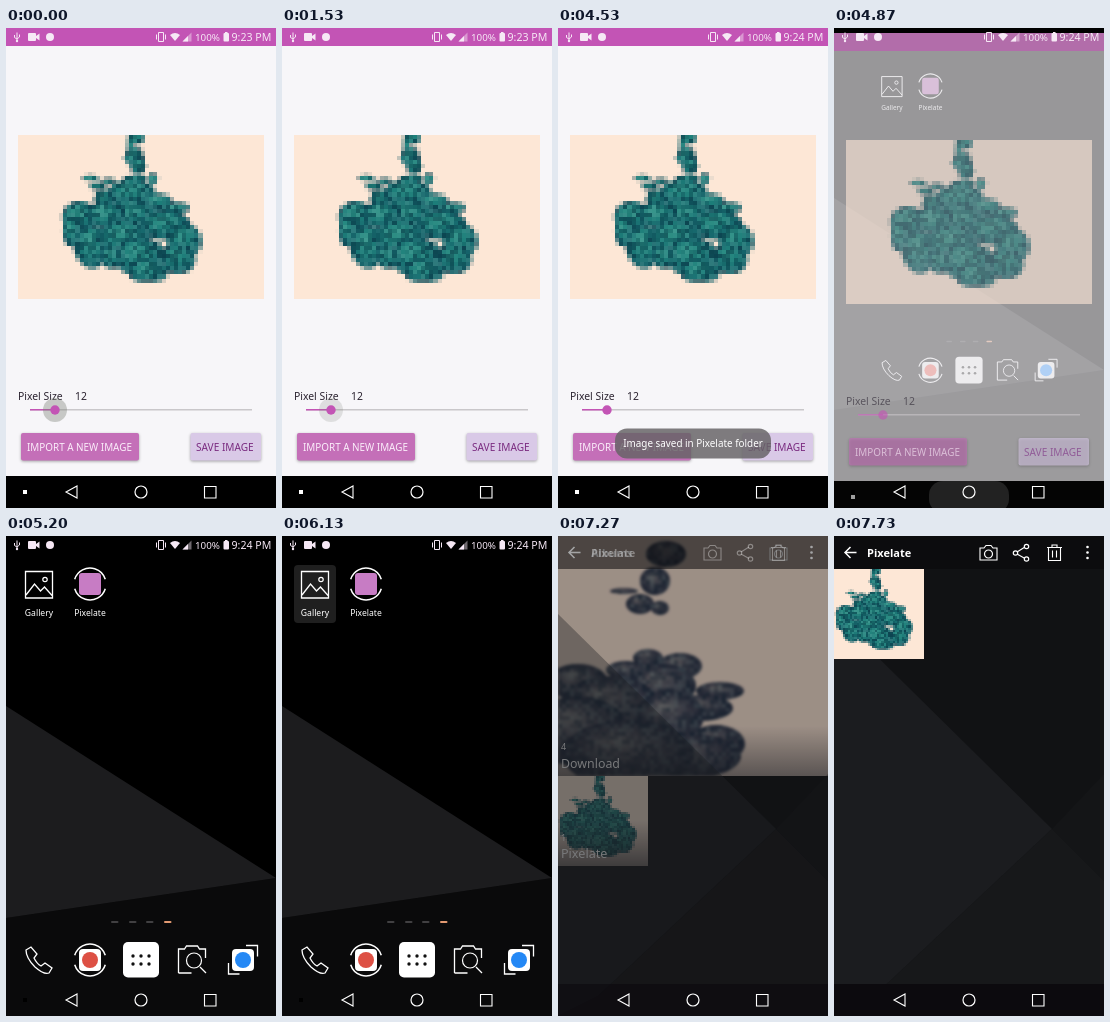
Animation of 270x480 px, one loop 8000 ms. Source, as an HTML page with a canvas:

```html
<!DOCTYPE html>
<html lang="en">
<head>
<meta charset="utf-8">
<title>Pixelate</title>
<style>
html, body { margin: 0; width: 100%; height: 100%; overflow: hidden; background: #000; }
canvas { display: block; }
</style>
</head>
<body>
<canvas id="stage" width="270" height="480"></canvas>
<script>
const c = document.getElementById('stage').getContext('2d');
const LOOP = 8000, TAU = Math.PI * 2;
const PURPLE = '#c354b5', PEACH = '#fde7d6';

const ramp = (t, a, b) => Math.min(1, Math.max(0, (t - a) / (b - a)));
const noise = n => { const v = Math.sin(n * 127.1 + 3.7) * 43758.5453; return v - Math.floor(v); };

function text(s, x, y, size, color, weight = 400, align = 'left') {
  c.font = `${weight} ${size}px "Noto Sans", "Open Sans", sans-serif`;
  c.textAlign = align;
  c.fillStyle = color;
  c.fillText(s, x, y);
}
function box(x, y, w, h, color, r = 0) {
  c.fillStyle = color;
  c.beginPath();
  c.roundRect(x, y, w, h, r);
  c.fill();
}
function dot(x, y, r, color) {
  c.fillStyle = color;
  c.beginPath();
  c.arc(x, y, r, 0, TAU);
  c.fill();
}
function stroke(path, color = '#fff', width = 1.1) {
  c.strokeStyle = color;
  c.lineWidth = width;
  c.stroke(new Path2D(path));
}
function fill(path, color) {
  c.fillStyle = color;
  c.fill(new Path2D(path));
}
function ring(x, y, r, from = 0, to = TAU, width = 1.2) {
  c.strokeStyle = '#fff';
  c.lineWidth = width;
  c.beginPath();
  c.arc(x, y, r, from, to);
  c.stroke();
}
// Draws a group with its own opacity and offset
function layer(alpha, dy, draw) {
  if (alpha <= 0) return;
  c.save();
  c.globalAlpha *= alpha;
  c.translate(0, dy);
  draw();
  c.restore();
}

// Ink clouds: shaded ellipses [x, y, rx, ry], then random mottling
function inkCloud(w, h, cell, blobs, tones, paper) {
  const make = () => {
    const el = document.createElement('canvas');
    el.width = Math.round(w / cell);
    el.height = Math.round(h / cell);
    return el;
  };
  const ink = make(), g = ink.getContext('2d');
  g.scale(1 / cell, 1 / cell);
  for (const [x, y, rx, ry] of blobs) {
    g.save();
    g.translate(x, y);
    g.scale(rx, ry);
    const shade = g.createRadialGradient(-.25, -.45, 0, 0, 0, 1);
    tones.forEach((tone, i) => shade.addColorStop(i / (tones.length - 1), tone));
    g.fillStyle = shade;
    g.beginPath();
    g.arc(0, 0, 1, 0, TAU);
    g.fill();
    g.restore();
  }
  g.globalCompositeOperation = 'source-atop';
  const step = Math.max(cell, 4);
  for (let y = 0, n = 0; y < h; y += step)
    for (let x = 0; x < w; x += step) {
      const v = noise(++n);
      g.fillStyle = v < .5 ? `rgba(0,30,50,${.45 - v * .7})` : `rgba(150,205,195,${(v - .5) * .4})`;
      g.fillRect(x, y, step, step);
    }
  const out = make(), o = out.getContext('2d');
  o.fillStyle = paper;
  o.fillRect(0, 0, out.width, out.height);
  if (cell === 1) o.filter = 'blur(1.5px)';
  o.drawImage(ink, 0, 0);
  return out;
}

const teal = inkCloud(246, 164, 4.1, [
  [118, 4, 9, 6], [116, 22, 10, 10], [120, 31, 8, 9], [112, 10, 3, 6],
  [72, 43, 9, 3], [80, 51, 9, 4], [91, 46, 8, 3], [135, 44, 5, 6], [117, 44, 13, 4],
  [114, 58, 24, 14], [86, 64, 10, 10], [155, 73, 17, 6], [140, 66, 14, 8],
  [62, 82, 18, 16], [54, 96, 9, 15], [112, 82, 32, 18], [88, 80, 20, 14],
  [74, 112, 18, 22], [147, 90, 26, 15], [166, 106, 18, 18], [160, 124, 18, 15],
  [106, 104, 26, 20], [122, 122, 27, 20], [130, 136, 20, 11], [94, 122, 10, 12]
], ['#2d9186', '#1b7c78', '#135c66'], PEACH);

const smoke = inkCloud(270, 240, 1, [
  [108, 18, 20, 13], [97, 45, 15, 14], [82, 68, 14, 10], [102, 72, 9, 7], [66, 55, 14, 3],
  [90, 122, 15, 9], [122, 130, 22, 13], [68, 134, 20, 9], [162, 155, 24, 9],
  [20, 146, 30, 18], [104, 150, 34, 22], [143, 172, 32, 13],
  [52, 170, 50, 30], [112, 180, 34, 26], [20, 195, 50, 35], [158, 208, 29, 19],
  [135, 220, 48, 22], [70, 218, 66, 34]
], ['#817a7c', '#4d4c5a', '#292e42'], '#e9d4c4');

function navButtons() {
  stroke('M71 458V470L60 464Z');
  ring(135, 464, 6);
  stroke('M198.5 458.5h11.5v11.5h-11.5z');
}

function statusBar(t) {
  const w = '#f6e8f5';
  stroke('M11 4.5V13M8.5 7v2.5l2.5 1.5l2.5-2V6.500', w, 1);
  dot(11, 13, 1.2, w);
  box(22, 5, 8, 8, w, 1);
  fill('M30 8l3.500-2.500v7l-3.500-2.500z', w);
  dot(44, 9, 4, w);
  stroke('M152.500 4.500h5v9h-5zM150.500 6.500v5M159.500 6.500v5', w, 1);
  fill('M164 7q5-4 10 0l-5 6z', w);
  fill('M185.500 4.500v9h-9z', 'rgba(246,232,245,.45)');
  fill('M182 8v5.500h-5.500z', w);
  text('100%', 189, 13, 9.8, w);
  box(217.5, 5, 5.5, 8.500, w, 1);
  box(219, 4, 2.5, 1.5, w);
  text(t < 2270 ? '9:23 PM' : '9:24 PM', 225.5, 13, 10.6, w);
}

function app(t) {
  box(0, 0, 270, 448, '#f7f6f9');
  box(0, 0, 270, 18, PURPLE);
  c.imageSmoothingEnabled = false;
  c.drawImage(teal, 12, 107, 246, 164);

  text('Pixel Size', 12, 372, 10.4, '#2b2330');
  text('12', 69, 372, 10.4, '#2b2330');
  box(24, 381, 222, 1.5, '#c9c7ca');
  box(24, 381, 25, 1.5, PURPLE);
  layer(1 - ramp(t, 1270, 1800), 0, () => dot(49, 382, 12, 'rgba(120,125,115,.38)'));
  dot(49, 382, 4.7, PURPLE);

  c.save();
  c.shadowColor = 'rgba(0,0,0,.35)';
  c.shadowBlur = 3;
  c.shadowOffsetY = 1;
  box(15, 405, 118, 27.5, '#c46fb8', 2);
  box(184.5, 405, 70.5, 27.5, '#d9c9e7', 2);
  c.restore();
  text('IMPORT A NEW IMAGE', 21, 423, 9.9, '#fbeefa');
  const press = ramp(t, 2200, 2400) * (1 - ramp(t, 2600, 3000));
  layer(press, 0, () => box(184.5, 405, 70.5, 27.5, 'rgba(90,50,110,.15)', 2));
  text('SAVE IMAGE', 190, 423, 10.1, '#7a2b80');

  layer(ramp(t, 2330, 2580) * (1 - ramp(t, 4530, 4740)), 0, () => {
    box(57, 400.500, 156, 30, 'rgba(102,100,102,.84)', 12);
    text('Image saved in Pixelate folder', 135, 419, 9.9, '#fff', 400, 'center');
  });
  box(0, 448, 270, 32, '#000');
  box(17, 462, 4, 4, '#fff');
}

function wallpaper() {
  box(0, 0, 270, 480, '#000');
  fill('M0 382L270 342V480H0Z', '#0a0a0b');
  fill('M0 170L270 342L0 382Z', '#1c1c1e');
}

function homeIcons() {
  stroke('M19.500 35.500h27v26.500h-27zM20 59l8.500-11l6 7l4-4l8 9', '#fff', 1.3);
  ring(39, 43.500, 2.2);
  text('Gallery', 33, 80, 8.6, '#fff', 500, 'center');
  for (const y of [48, 424]) {
    ring(84, y, 16, .3, Math.PI - .3, 1.5);
    ring(84, y, 16, Math.PI + .3, -.3, 1.5);
  }
  box(73, 37, 22, 22, '#c77cc4', 3);
  text('Pixelate', 84, 80, 8.6, '#fff', 500, 'center');

  [105, 123, 140, 158].forEach((x, i) => box(x, 385, 7.5, 2, i < 3 ? '#414042' : '#e39a72', 1));

  stroke('M20 414l5-3l6 7l-3 4q3 6 7 8l4-3l7 5l-3 5q-5 2-14-6q-9-9-9-17z', '#fff', 1.3);
  box(73, 413, 22, 22, '#fff', 4);
  dot(84, 424, 8, '#dd5044');
  box(117, 406, 36, 35.500, '#fff', 5);
  for (const y of [420, 428]) for (const x of [127, 135, 143]) dot(x, y, 1.7, '#111');
  stroke('M172.500 437V413h6l2-3h11l2 3h6v9M172.500 437h13M194 431l6 6', '#fff', 1.3);
  ring(188, 424.500, 7.5);
  stroke('M240 409.500h11.500v11M222.500 427v11h11', '#fff', 1.3);
  box(226, 413, 22, 22, '#fff', 4);
  dot(237, 424, 8, '#2488f5');
}

function home(t) {
  wallpaper();
  const k = (1 - ramp(t, 4740, 5200)) ** 2, s = 1 - .477 * k;
  c.save();
  c.globalAlpha = ramp(t, 4700, 4900);
  c.translate(135, 240 - 72 * k);
  c.scale(s, s);
  c.translate(-135, -240);
  homeIcons();
  c.restore();
}

function galleryBack() {
  box(0, 0, 270, 480, '#111214');
  fill('M0 78L218 293L40 460L0 480Z', '#1b1c1f');
  fill('M270 238V345L218 293Z', '#141517');
  fill('M218 293L270 345V480H0L40 460Z', '#17181a');
  box(0, 448, 270, 32, '#0c0a0e');
}

function header(title, bar) {
  box(0, 0, 270, 33, bar);
  stroke('M22.500 16.500H11M16.500 11L11 16.500L16.500 22', '#fff', 1.5);
  text(title, 33, 21, 11, '#fff', 600);
  for (const y of [11, 16.500, 22]) dot(253.500, y, 1.3, '#fff');
}
function camera(x) {
  c.save();
  c.translate(x, 17);
  stroke('M-8.500-5h4l2-2.500h5l2 2.500h4v12h-17z');
  ring(0, 1, 4);
  c.restore();
}

function albums(t) {
  galleryBack();
  layer(ramp(t, 6420, 6695), 0, () => c.drawImage(smoke, 0, 0));
  const scrim = c.createLinearGradient(0, 190, 0, 240);
  scrim.addColorStop(0, 'rgba(30,32,40,0)');
  scrim.addColorStop(1, 'rgba(30,32,40,.5)');
  box(0, 190, 270, 50, scrim);
  const tile = c.createLinearGradient(0, 240, 0, 330);
  tile.addColorStop(0, '#252427');
  tile.addColorStop(1, '#1d1c20');
  box(0, 240, 90, 90, tile);
  layer(ramp(t, 6530, 6790), 0, () => c.drawImage(teal, 10, 0, 40, 40, 0, 240, 90, 90));
  const shade = c.createLinearGradient(0, 285, 0, 330);
  shade.addColorStop(0, 'rgba(20,20,25,0)');
  shade.addColorStop(1, 'rgba(20,20,25,.6)');
  box(0, 285, 90, 45, shade);
  layer(ramp(t, 6930, 7080) * (1 - ramp(t, 7150, 7300)), 0, () => box(0, 240, 90, 90, 'rgba(255,255,255,.25)'));
  text('4', 3, 214, 9, '#fff');
  text('Download', 3, 232, 12.4, '#fff');
  text('1', 3, 305, 9, '#fff');
  text('Pixelate', 3, 322, 12.6, '#fff');
  header('Albums', 'rgba(0,0,0,.3)');
  camera(220.500);
}

function detail(t) {
  galleryBack();
  layer(ramp(t, 7330, 7600), 0, () => c.drawImage(teal, 10, 0, 40, 40, 0, 33, 90, 90));
  header('Pixelate', '#0c0c0e');
  camera(154.500);
  stroke('M183 16l8-5M183 18l8 4.500');
  for (const [x, y] of [[181.500, 17], [192.500, 10.500], [192.500, 23]]) ring(x, y, 2.2);
  stroke('M213 11.500h15M218 11.500v-2.500h5v2.500M214.500 11.500v13h12v-13M218.500 14.500v7M222.500 14.500v7');
}

function draw(t) {
  c.globalAlpha = 1;
  c.imageSmoothingEnabled = false;
  if (t < 6450) {
    if (t >= 4700) home(t);
    const leave = ramp(t, 4740, 5080);
    layer(1 - leave, 13 * leave, () => app(t));
    layer(ramp(t, 4640, 4760) * (1 - ramp(t, 4930, 5070)), 0, () => {
      c.fillStyle = '#222';
      c.beginPath();
      c.roundRect(95, 453, 80, 32, 14);
      c.fill();
    });
    if (t >= 4740) box(17, 462, 4, 4, '#000');
    statusBar(t);
    layer(ramp(t, 6000, 6100) * (1 - ramp(t, 6200, 6300)), 0, () => box(12, 29, 42, 58, 'rgba(255,255,255,.12)', 4));
  }
  const open = ramp(t, 6200, 6430);
  layer(open, 20 * (1 - open) ** 2, () => albums(t));
  layer(ramp(t, 7200, 7400), 0, () => detail(t));
  navButtons();
}

const start = performance.now();
function tick() {
  draw((performance.now() - start) % LOOP);
  requestAnimationFrame(tick);
}
tick();
</script>
</body>
</html>
```
